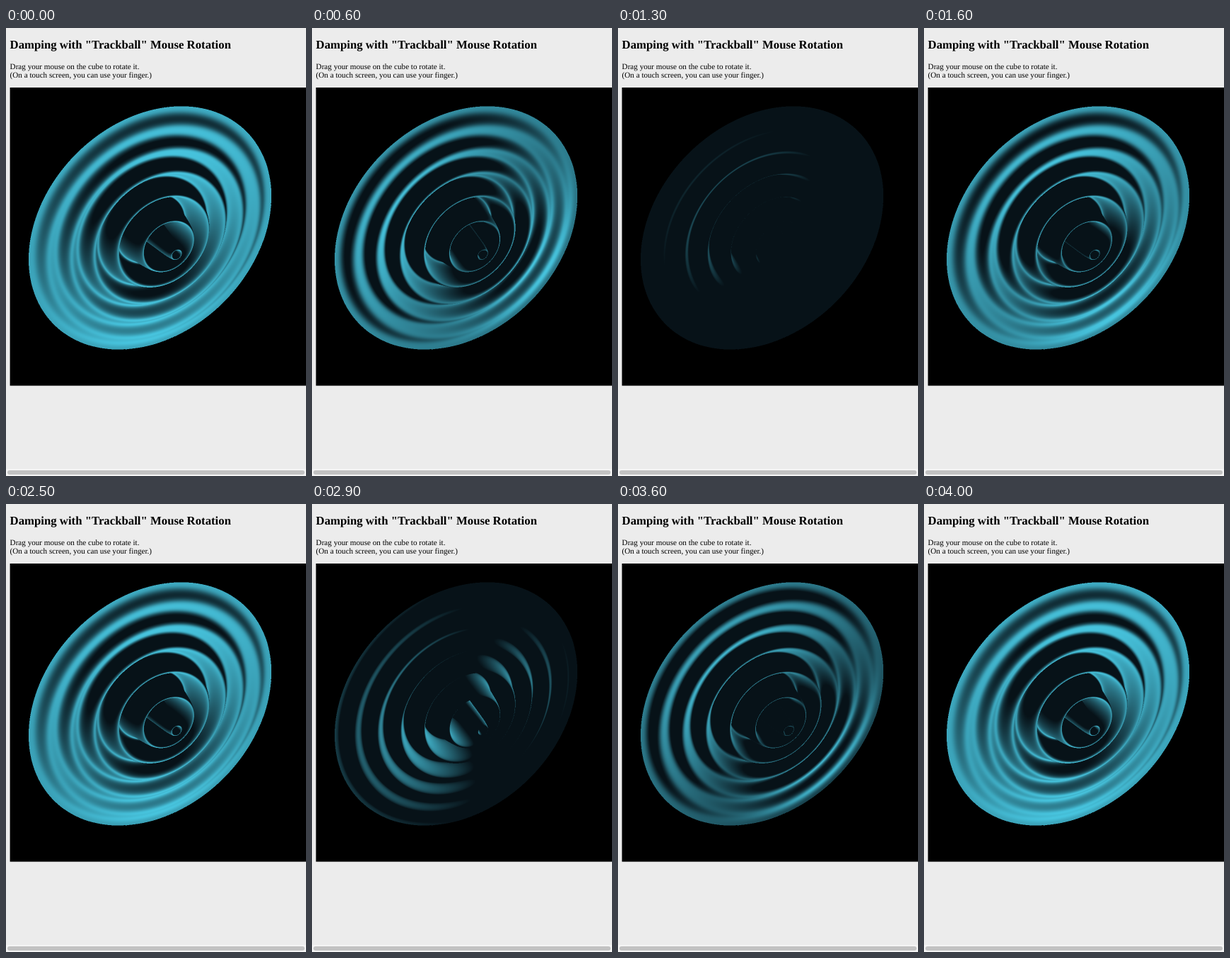
Write an HTML page with a canvas that moves like this. It is 424 by 632 pixels and loops after 4.1 s.

```html
<!DOCTYPE html>
<html lang="en">
<head>
<meta charset="utf-8">
<title>Trackball rotation</title>
<style>
  html, body { margin: 0; width: 424px; height: 632px; overflow: hidden; background: #ececec; }
  svg, canvas { position: absolute; display: block; }
  svg { left: 0; top: 0; }
  canvas { left: 28px; top: 106px; }
  text { font: 11.15px "Liberation Serif", "Times New Roman", serif; text-rendering: geometricPrecision; }
  .title { font-size: 16.75px; font-weight: bold; }
</style>
</head>
<body>
<svg width="424" height="632">
  <text class="title" x="5.6" y="29.4">Damping with "Trackball" Mouse Rotation</text>
  <text x="5.6" y="57.6">Drag your mouse on the cube to rotate it.</text>
  <text x="5.6" y="70.3">(On a touch screen, you can use your finger.)</text>
  <rect x="5.6" y="84" width="419" height="420.6"/>
  <rect y="622" width="424" height="10" fill="#f5f5f5"/>
  <rect x="2" y="624" width="420" height="6" rx="3" fill="#c2c2c2"/>
</svg>
<canvas width="350" height="352"></canvas>
<script>
const canvas = document.querySelector('canvas');
const ctx = canvas.getContext('2d');
const { width, height } = canvas;
const image = ctx.createImageData(width, height);

// Damped ripple on a disc: radius, wave number, height, decay; camera distance and tilt.
const R = 191.2, K = 12 * Math.PI / R, H = 61, DECAY = 57;
const DIST = 1055, TILT = 0.705;
const CENTER = { x: 216 - 28, y: 294.4 - 106 };
const SIN = Math.sin(TILT), COS = Math.cos(TILT);
const AMBIENT = [7, 18, 24], DIFFUSE = [64, 178, 198];

const envelope = r => H * Math.exp(-r / DECAY);
const surface = r => r > R ? -99 : envelope(r) * Math.sin(K * r);
const slope = r => envelope(r) * (K * Math.cos(K * r) - Math.sin(K * r) / DECAY);

// Casts a ray in disc coordinates (u, v in the plane, w along the axis); returns point and normal.
function castRay(px, py) {
  const u0 = (px - py) * Math.SQRT1_2, q = (px + py) * Math.SQRT1_2;
  const v0 = q * COS, w0 = q * SIN;
  const du = u0 / DIST, dv = v0 / DIST + SIN, dw = w0 / DIST - COS;
  const radius = t => Math.hypot(u0 + du * t, v0 + dv * t);
  let t = (60 - w0) / dw, last = t;
  for (;;) {
    const r = radius(t), w = w0 + dw * t, top = envelope(r);
    if (r > R && w < -top) return null;
    if (w < top && w < surface(r)) break;
    last = t;
    t += Math.max(0.6, 0.35 * (w - top));
  }
  for (let i = 0; i < 8; i++) {
    const mid = (last + t) / 2;
    if (w0 + dw * mid < surface(radius(mid))) t = mid; else last = mid;
  }
  const r = radius(t), u = u0 + du * t, v = v0 + dv * t, w = w0 + dw * t;
  if (r > R || Math.abs(w - surface(r)) > 0.5) return null;
  const s = slope(r), n = 1 / Math.hypot(1, s), k = -s * n / (r || 1);
  return [u, v, w, k * u, k * v, n];
}

// Up to four surface samples per pixel.
const SUB = [0.25, 0.75];
const pixels = [];
for (let y = 0; y < height; y++) {
  for (let x = 0; x < width; x++) {
    const samples = [];
    for (const sy of SUB) for (const sx of SUB) {
      const hit = castRay(x + sx - CENTER.x, y + sy - CENTER.y);
      if (hit) samples.push(hit);
    }
    if (samples.length) pixels.push({ at: 4 * (y * width + x), samples });
  }
}

// Direction of the point light over one orbit: time, u, v, w.
const ORBIT = 2050, LIGHT_DIST = 420;
const LIGHT = [
  [0, -0.42, 0.42, 0.78],
  [350, -0.42, 0.42, 0.78],
  [450, -0.36, 0.48, 0.74],
  [800, 0.85, 0.53, -0.15],
  [1000, 0.6, 0.6, -0.6],
  [1150, 0.2, 0.6, -0.77],
  [1250, 0.1, 0.6, -0.77],
  [1550, 0, 0.9, 0.36],
  [1600, -0.2, 0.66, 0.62],
  [1950, -0.4, 0.43, 0.77],
  [ORBIT, -0.42, 0.42, 0.78]
];

function lightAt(time) {
  const i = LIGHT.findIndex(key => key[0] > time);
  const a = LIGHT[i - 1], b = LIGHT[i], f = (time - a[0]) / (b[0] - a[0]);
  const dir = [1, 2, 3].map(j => a[j] + (b[j] - a[j]) * f);
  const scale = LIGHT_DIST / Math.hypot(...dir);
  return dir.map(c => c * scale);
}

function draw(time) {
  const [lu, lv, lw] = lightAt(time % ORBIT);
  for (const { at, samples } of pixels) {
    let lit = 0;
    for (const [u, v, w, nu, nv, nw] of samples) {
      const a = lu - u, b = lv - v, c = lw - w;
      const dot = nu * a + nv * b + nw * c;
      if (dot > 0) lit += dot / Math.sqrt(a * a + b * b + c * c);
    }
    const cover = samples.length / 4;
    for (let c = 0; c < 3; c++) image.data[at + c] = AMBIENT[c] * cover + DIFFUSE[c] * lit / 4;
    image.data[at + 3] = 255;
  }
  ctx.putImageData(image, 0, 0);
}

let shown = -1;
const start = performance.now();
function tick() {
  const step = Math.floor((performance.now() - start) % (2 * ORBIT) / 100) * 100;
  if (step !== shown) draw(shown = step);
  requestAnimationFrame(tick);
}
tick();
</script>
</body>
</html>
```
